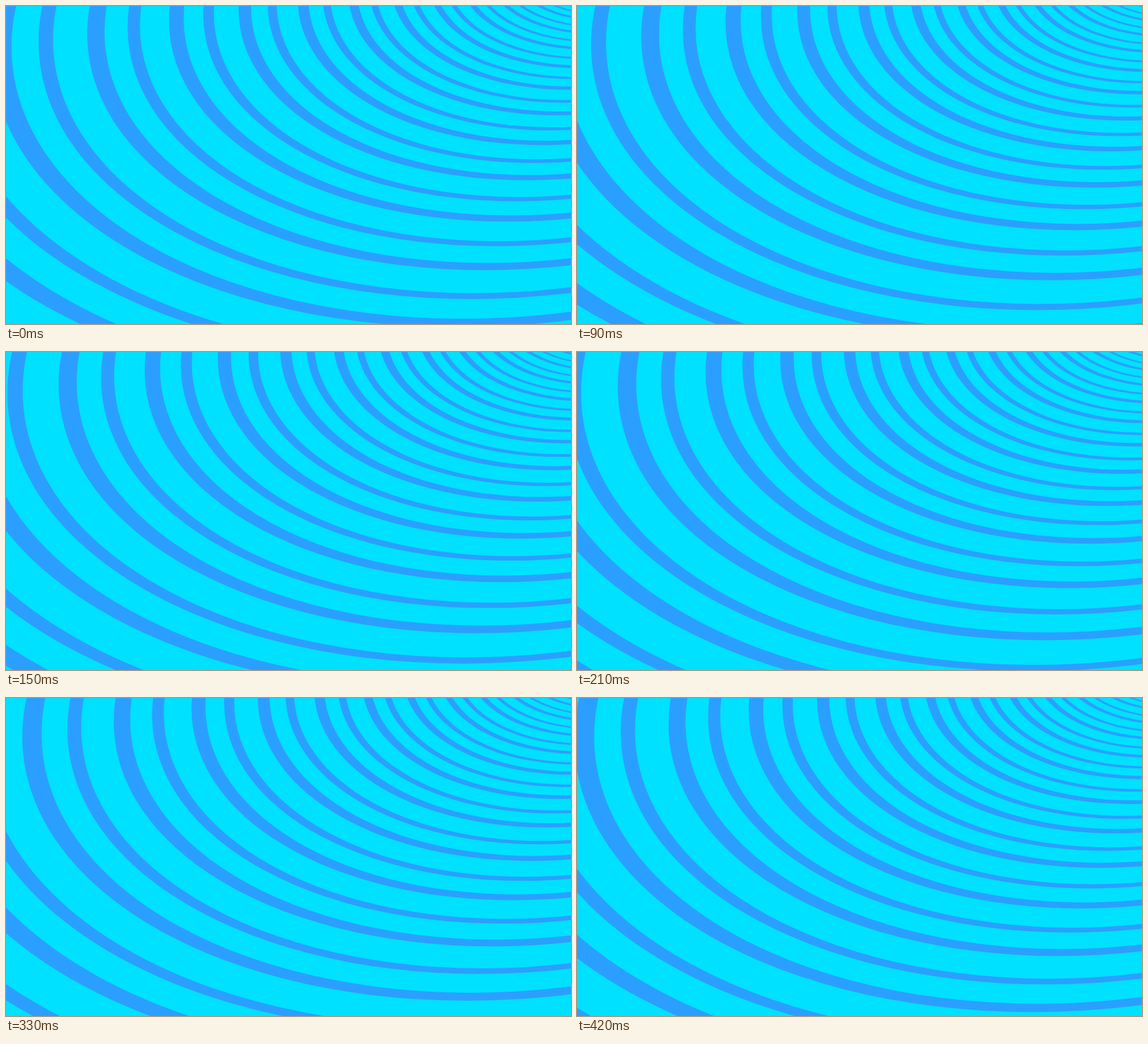
An HTML page with a canvas that plays this animation: 998x561 px, repeating every 0.45 s.

```html
<!DOCTYPE html>
<html lang="en">
<head>
<meta charset="utf-8">
<title>Rings</title>
<style>
  html, body { margin: 0; width: 100%; height: 100%; overflow: hidden; background: #00e1ff; }
  canvas { display: block; }
</style>
</head>
<body>
<canvas id="stage" width="998" height="561"></canvas>
<script>
const ctx = document.getElementById('stage').getContext('2d');
const CYAN = '#00e1ff', BLUE = '#2b9fff';
const VANISH = { x: 1113, y: -109 };
const GROWTH = 1.175;   // size ratio between rings of the same kind
const RATE = 0.01017;   // logarithmic growth per step
const STEP = 30, STEPS = 15;

// Inner edge of each kind, relative to its outer edge.
const KINDS = [
  { size: 626, left: 0.9757, bottom: 0.9835 },
  { size: 575, left: 0.9686, bottom: 0.978 }
];

// Leaning ellipse, set by its leftmost and lowest points.
function oval(size, left, bottom, lean, color) {
  const mid = (left + bottom) / 2;
  const leftX = 1.686 * size * left, leftY = 0.275 * size * mid;
  const lowX = 0.465 * size * mid, lowY = size * bottom;
  const a = (leftX - lowX) / (1 - lean);
  const b = (lowY - leftY) / (1 - lean);
  ctx.setTransform(a, -lean * b, 0, b * Math.sqrt(1 - lean * lean),
    VANISH.x - lowX + lean * a, VANISH.y + leftY - lean * b);
  ctx.beginPath();
  ctx.arc(0, 0, 1, 0, Math.PI * 2);
  ctx.fillStyle = color;
  ctx.fill();
}

function draw(step) {
  ctx.setTransform(1, 0, 0, 1, 0, 0);
  ctx.fillStyle = CYAN;
  ctx.fillRect(0, 0, 998, 561);
  const zoom = Math.exp(RATE * step);
  for (let k = 4; k > -18; k--) {
    for (const kind of KINDS) {
      const size = kind.size * Math.pow(GROWTH, k) * zoom;
      oval(size, 1, 1, 0.098, BLUE);
      oval(size, kind.left, kind.bottom, 0.092, CYAN);
    }
  }
}

let last = -1;
function tick() {
  const step = Math.floor(performance.now() / STEP) % STEPS;
  if (step !== last) draw(last = step);
  requestAnimationFrame(tick);
}
tick();
</script>
</body>
</html>
```
